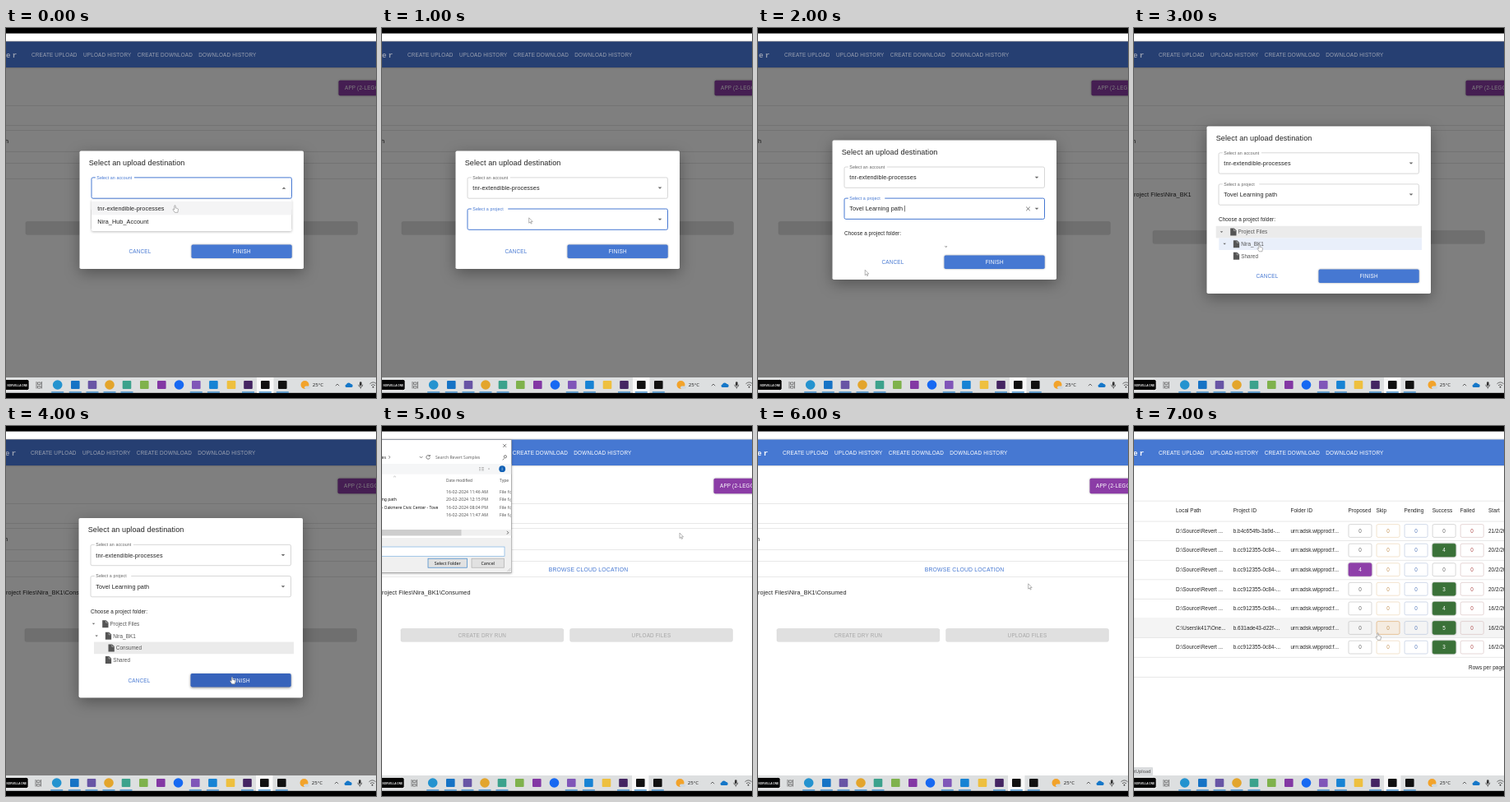
Animation, 450 px wide and 450 px high, one loop 8000 ms. Source, as an HTML page:

```html
<!DOCTYPE html>
<html lang="en">
<head>
<meta charset="utf-8">
<title>Upload destination</title>
<style>
html, body { margin: 0; width: 100%; height: 100%; overflow: hidden; background: #000; }
svg { display: block; width: 100vw; height: 100vh; }
text { font-family: "Liberation Sans", Arial, sans-serif; white-space: pre; }
.mono { font-family: "Liberation Mono", monospace; font-weight: 700; letter-spacing: 2.18px; }
.win { font-family: "Noto Sans", sans-serif; }
.btn { letter-spacing: .0286em; }
.body { letter-spacing: .01em; }
.paper { filter: drop-shadow(0 5px 9px rgba(0,0,0,.34)); }
.menu { filter: drop-shadow(0 1.2px 1.6px rgba(0,0,0,.26)); }
.low { filter: drop-shadow(0 .8px .8px rgba(0,0,0,.35)); }
.high { filter: drop-shadow(0 1.5px 1.8px rgba(0,0,0,.45)); }
</style>
</head>
<body>
<svg id="stage" viewBox="0 0 450 450" xmlns="http://www.w3.org/2000/svg"></svg>
<script>
const BLUE = '#4678d2', INK = '#222', SMALL = 6.37, BODY = 7.28;
const ACCOUNT = 'tnr-extendible-processes', PROJECT = 'Tovel Learning path', FOLDER = 'Nira_BK1';

const rect = (x, y, w, h, fill, more = '') =>
  `<rect x="${x}" y="${y}" width="${w}" height="${h}" fill="${fill}" ${more}/>`;
const circle = (x, y, r, fill) => `<circle cx="${x}" cy="${y}" r="${r}" fill="${fill}"/>`;
const text = (x, y, s, size = SMALL, fill = INK, more = 'class="body"') =>
  `<text x="${x}" y="${y}" font-size="${size}" fill="${fill}" ${more}>${s}</text>`;
const mid = (x, y, s, fill, size = SMALL, cls = 'btn') =>
  text(x, y, s, size, fill, `class="${cls}" text-anchor="middle"`);
const path = (d, stroke, w = .7, fill = 'none') =>
  `<path d="${d}" stroke="${stroke}" stroke-width="${w}" fill="${fill}"/>`;
const line = (y, fill = '#dfdfdf') => rect(-5, y, 460, .7, fill);
const caret = (x, y, up = 1, w = 2.3) =>
  `<path d="M${x - w} ${y - up * w / 2}h${2 * w}l${-w} ${up * w}z" fill="#666"/>`;

function pointer(kind, x, y) {
  const d = kind === 'hand'
    ? 'm-1.2-4c0-1.1 1.4-1.1 1.4 0v2.4l2.5.6q.9.3.7 1.4l-.5 3.4h-3.6l-2.2-3.2c-.4-.8.5-1.3 1.1-.7l.6.6z'
    : 'm-1.3-3.2v6.4l1.5-1.3 1 2.2 1-.4-1-2.2h2z';
  return `<path d="M${x} ${y}${d}" fill="#fff" stroke="#777" stroke-width=".55"/>`;
}

function header(fill, ink) {
  const links = [[30, 'CREATE UPLOAD'], [93, 'UPLOAD HISTORY'], [158.7, 'CREATE DOWNLOAD'], [233.3, 'DOWNLOAD HISTORY']];
  return rect(-5, 16.5, 460, 31.5, fill, 'class="low"') +
    text(-8.6, 35.8, 'ger', 9.1, ink, 'class="mono"') +
    links.map(([x, s]) => text(x, 35.2, s, SMALL, ink, 'class="btn"')).join('');
}

function uploadPage(dest) {
  // The chosen folder's line pushes the buttons down.
  const y = dest ? 246.5 : 235.5;
  const off = (x, s) => rect(x, y, 197.7, 15.8, '#e0e0e0', 'rx="1.8" stroke="#d2d2d2" stroke-width=".5"') +
    mid(x + 98.8, y + 10.3, s, '#a6a6a6');
  return rect(403.5, 63.8, 60, 18.4, '#8b3ca6', 'rx="1.8" class="low"') +
    text(411, 75.4, 'APP (2-LEGGED)', SMALL, '#fff', 'class="btn"') +
    [94, 118.3, 124.3, 150.2, 164, 183.3].map(y => line(y)).join('') +
    text(-2, 140, 'h', BODY) + mid(251, 176.9, 'BROWSE CLOUD LOCATION', BLUE, 6.83) +
    (dest ? text(-5, 204.8, 'Project Files\\' + dest, BODY) : '') +
    off(23, 'CREATE DRY RUN') + off(228.7, 'UPLOAD FILES');
}

function field(y, label, value, focus, up) {
  const c = focus ? BLUE : '#bdbdbd';
  return rect(103, y, 243.5, 25.3, '#fff', `rx="1.8" stroke="${c}" stroke-width="${focus ? 1 : .6}"`) +
    rect(107.8, y - 1.5, label.length * 2.64 + 2.2, 3, '#fff') +
    text(109.3, y + 1.7, label, 5.3, focus ? BLUE : '#666') +
    text(109.3, y + 15.2, value, BODY) + caret(337, y + 12.8, up ? -1 : 1);
}

// Tree row: [label, depth, has arrow, background]
function treeRow([label, depth, open, bg], i, top) {
  const y = top + 128.7 + 14.6 * i, x = 117.2 + 3.65 * depth;
  return (bg ? rect(99.7 + 3.65 * depth, y - 7.3, 250.3 - 3.65 * depth, 14.6, bg) : '') +
    (open ? caret(x - 10.7, y, 1, 1.7) : '') +
    `<path d="M${x} ${y - 4.5}h4.6l2.7 2.7v6.3h-7.3z" fill="#555"/>` +
    path(`M${x + 4.3} ${y - 4}v2.5h2.4`, '#ddd', .5) +
    text(x + 9.3, y + 2.2, label, SMALL, '#555');
}

function dialog({ top, end, value, project, projFocus, menu, rows, loading, hover }) {
  let s = rect(88.5, top, 272.5, end - top, '#fff', 'rx="1.8" class="paper"') +
    text(99.7, top + 17.4, 'Select an upload destination', 9.1) +
    field(top + 32.4, 'Select an account', value, menu, menu) +
    field(top + 70.5, 'Select a project', project, projFocus);
  if (rows || loading) s += text(103, top + 115.7, 'Choose a project folder:');
  if (loading) s += path(`M324.2 ${top + 81}l4.6 4.6m0-4.6l-4.6 4.6`, '#555', .8) +
    rect(176.3, top + 79.3, .6, 7.5, INK) + path(`M225.5 ${top + 128.8}q1 1.6 2.3.2`, '#555', .9);
  if (rows) s += rows.map((r, i) => treeRow(r, i, top)).join('');
  s += mid(162, end - 18.9, 'CANCEL', BLUE) +
    rect(224.5, end - 29.4, 122.2, 16.4, hover ? '#3763bb' : BLUE, `rx="1.8" class="${hover ? 'high' : 'low'}"`) +
    mid(285.7, end - 18.9, 'FINISH', '#fff');
  if (menu) s += rect(103, 208.6, 243.5, 38.4, '#fff', 'rx="1.8" class="menu"') +
    rect(103, 210.8, 243.5, 16.6, '#f4f4f5') +
    text(110.2, 221.8, ACCOUNT, BODY) + text(110.2, 238.2, 'Nira_Hub_Account', BODY);
  return s;
}

function filePicker() {
  const w = (x, y, s, fill = '#222', size = 5.2) => text(x, y, s, size, fill, 'class="win"');
  const files = [['', '16-02-2024 11:46 AM'], ['ng path', '20-02-2024 12:15 PM'],
    ['- Oakmere Civic Center - Tove', '16-02-2024 08:04 PM'], ['', '16-02-2024 11:47 AM']];
  const btn = (x, width, s, edge) => rect(x, 161.2, width, 11, '#e1e1e1', `stroke="${edge}" stroke-width=".7"`) +
    mid(x + width / 2, 168.6, s, '#111', 5.3, 'win');
  return rect(-5, 16.7, 162.5, 161.6, '#fff', 'stroke="#888" stroke-width=".6" class="menu"') +
    path('M147.2 21.9l4 4m0-4l-4 4', '#333', .6) +
    w(-.5, 39.8, 'es') + path('M8.2 36.3l1.6 1.6-1.6 1.6M45.8 37l1.8 1.8 1.8-1.8', '#444') +
    path('M58 36.5a2.3 2.3 0 1 0 .4 2M58.3 35v1.8h-1.8', '#444') +
    w(65, 39.9, 'Search Revert Samples', '#666', 5.1) +
    path('M148.5 39.5l-1.8 1.8M148.3 37.3a1.6 1.6 0 1 1 3.2 0a1.6 1.6 0 1 1-3.2 0', '#444') +
    rect(-5, 46, 162.2, 12.6, '#f5f6f7') +
    path('M118 50.5h2m1 0h3m-6 1.7h2m1 0h3m-6 1.7h2m1 0h3', '#aaa', .8) + caret(130, 52.2, 1, 1) +
    circle(146.2, 52.2, 3.9, '#1160b4') + mid(146.2, 54.2, 'i', '#fff', 5.2) +
    path('M14 62.3l1.5-1.3 1.5 1.3', '#888', .5) +
    w(78, 68, 'Date modified', '#555', 4.8) + w(143, 68, 'Type', '#555', 5) +
    files.map(([name, date], i) => {
      const y = 81.9 + 9.5 * i;
      return w(-.3, y, name, '#111', 5) + w(78, y, date, '#555') + w(143, y, 'File f', '#555') +
        path(`M157 ${y - 2.2}a1.2 1.2 0 1 0 0 1.8`, '#555', .5);
    }).join('') +
    rect(-5, 126, 162.2, 7.4, '#f0f0f0') + rect(-5, 126, 101.5, 7.4, '#cdcdcd') +
    path('M152 127.8l1.8 1.9-1.8 1.9', '#444', .8) +
    rect(-5, 136, 162.2, 42, '#f0f0f0') +
    rect(-5, 147, 154, 11.3, '#fff', 'stroke="#7db2e2" stroke-width=".7"') +
    btn(56, 47.5, 'Select Folder', '#3b83c8') + btn(109, 39.5, 'Cancel', '#adadad') +
    path('M152.5 176.8l4-4m-2 4l2-2', '#aaa', .6);
}

function historyPage() {
  const cols = [[51, 'Local Path'], [120.7, 'Project ID'], [190.5, 'Folder ID'], [260.5, 'Proposed'],
    [294.5, 'Skip'], [328.5, 'Pending'], [362.7, 'Success'], [396.8, 'Failed'], [431, 'Start']];
  const look = [['#bdbdbd', '#666'], ['#ead0ae', '#c69557'], ['#b4c1da', '#5a7dbd'], ['#bdbdbd', '#666'], ['#d6bcbc', '#b04e4e']];
  const done = [0, 4, 0, 3, 4, 5, 3], days = [21, 20, 20, 20, 16, 16, 16];
  let s = line(90.8) + line(115.7) + cols.map(([x, name]) => text(x, 105.3, name)).join('');
  done.forEach((n, r) => {
    const y = 127.5 + 23.6 * r, hot = r === 5;
    const id = r === 0 ? 'b4c654fb-3a9d' : hot ? '631ade43-d22f' : 'cc912355-0c84';
    if (hot) s += rect(-5, y - 11.6, 460, 23.4, '#f4f4f4');
    s += line(y + 11.8) +
      text(51, y + 2.3, hot ? 'C:\\Users\\k417\\One...' : 'D:\\Source\\Revert ...') +
      text(120.7, y + 2.3, `b.${id}-...`) + text(190.5, y + 2.3, 'urn:adsk.wipprod:f...') +
      text(431, y + 2.3, days[r] + '/2/2024');
    look.forEach(([edge, ink], c) => {
      const v = c === 3 ? n : c === 0 && r === 2 ? 4 : 0;
      const over = hot && c === 1;
      const fill = v ? (c ? '#3a7138' : '#8e3fa9') : over ? '#f5ece1' : 'none';
      const x = 261 + 34.05 * c;
      s += rect(x, y - 7.9, 28, 15.8, fill, `rx="1.8" stroke="${v ? fill : over ? '#dca765' : edge}" stroke-width=".6" ${v ? 'class="low"' : ''}`) +
        mid(x + 14, y + 2.3, v, v ? '#fff' : ink);
    });
  });
  return s + line(305) + text(407, 295.6, 'Rows per page:') +
    rect(-5, 415, 28, 10, '#dadcde', 'rx="1"') +
    text(20.3, 421.8, 'tUpload', 5.4, '#444', 'class="win" text-anchor="end"');
}

function taskbar() {
  // centre, colour, round, running
  const apps = [[61.7, '#2493cf', 1, 1], [83.3, '#1673c5', 0, 1], [104, '#6855a5', 0, 1], [125, '#e3a52c', 1, 1],
    [146, '#3ca28c', 0, 1], [167.3, '#7fb24c', 0, 0], [188.3, '#8338a4', 0, 0], [209.5, '#1769f2', 1, 0],
    [230.3, '#8056b8', 0, 1], [251.4, '#1783d4', 0, 1], [273, '#eec03f', 0, 0], [293.5, '#442562', 0, 1],
    [314.3, '#111', 0, 1], [335.3, '#111', 0, 1]];
  return rect(-5, 425, 460, 18.8, '#dddfe0') + rect(304, 425, 20.5, 18.8, '#f8f8f8') +
    rect(-12, 427.3, 39.2, 13.4, '#050505', 'rx="2.4" stroke="#fff" stroke-width="1"') +
    text(25, 435.5, 'NORVELLA ONE', 3.1, '#eee', 'font-weight="700" text-anchor="end"') +
    path('M36 430v8.5M42.5 430v8.5M37.5 431h3.6v2.5h-3.6zM37.5 435.5h3.6v2.5h-3.6z', '#555') +
    apps.map(([x, c, round, on]) => (round ? circle(x, 434, 5.8, c) : rect(x - 5.3, 429, 10.6, 10, c, 'rx="1"')) +
      (on ? rect(x - 7.5, 442.3, 15, 1.3, '#277fc5') : '')).join('') +
    circle(362.5, 434, 5, '#f2a32b') + rect(362, 435.5, 7, 3.4, '#cfd8e0', 'rx="1.7"') +
    text(371.8, 436.4, '25°C', 6, '#222', 'class="win"') +
    path('M399.8 435.2l2.2-2.2 2.2 2.2', '#333') +
    '<path d="M412.7 437a1.9 1.9 0 0 1 .3-3.6a3 3 0 0 1 5.5-.3a2 2 0 0 1 .8 3.9z" fill="#1677c8"/>' +
    rect(429, 430.2, 2.6, 5, '#333', 'rx="1.3"') + path('M427.8 433.7q0 3 2.5 3t2.5-3M430.3 436.7v2', '#333') +
    path('M441.5 432.7q4-3.6 8 0M443 434.7q2.5-2 5 0', '#333') + circle(445.5, 436.7, .9, '#333');
}

const SHARED = { value: ACCOUNT, project: PROJECT };
const scenes = [
  { dx: 1, box: { top: 149.5, end: 293, value: '', project: '', menu: true }, at: ['hand', 206, 220.5] },
  { dx: 1, box: { top: 149.5, end: 293, value: ACCOUNT, project: '', projFocus: true }, at: ['arrow', 180, 234] },
  { dx: 2, box: { ...SHARED, top: 136.6, end: 306, projFocus: true, loading: true }, at: ['arrow', 131.5, 297.5] },
  { dx: 0, dest: FOLDER, at: ['hand', 153, 268], box: { ...SHARED, top: 119.4, end: 323,
    rows: [['Project Files', 0, 1, '#ebebeb'], [FOLDER, 1, 1, '#e9effa'], ['Shared', 1, 0]] } },
  { dx: 0, dest: FOLDER + '\\Consumed', at: ['hand', 275.5, 310], box: { ...SHARED, top: 112, end: 330.4, hover: true,
    rows: [['Project Files', 0, 1], [FOLDER, 1, 1], ['Consumed', 2, 0, '#ebebeb'], ['Shared', 1, 0]] } },
  { dx: 0, dest: FOLDER + '\\Consumed', picker: true, at: ['arrow', 363.3, 133.3] },
  { dx: 0, dest: FOLDER + '\\Consumed', at: ['arrow', 330, 195] },
  { dx: 0, history: true, at: ['hand', 297, 256.5] }
];

function draw({ dx, box, dest, picker, history, at }) {
  return rect(0, 0, 450, 450, '#000') + rect(0, 6.6, 450, 418.4, '#fff') +
    `<g transform="translate(${dx} 0)">` +
    (history ? historyPage() : uploadPage(dest)) +
    (box ? rect(-5, 16.5, 460, 408.5, '#000', 'opacity=".5"') : '') +
    header(box ? '#263f72' : BLUE, box ? '#9aa1b2' : '#fff') +
    (box ? dialog(box) : '') + (picker ? filePicker() : '') + taskbar() + '</g>' +
    pointer(...at);
}

const stage = document.getElementById('stage');
let shown = -1;
function tick(now) {
  const i = Math.floor(now % 8000 / 1000);
  if (i !== shown) stage.innerHTML = draw(scenes[shown = i]);
  requestAnimationFrame(tick);
}
tick(0);
</script>
</body>
</html>
```
